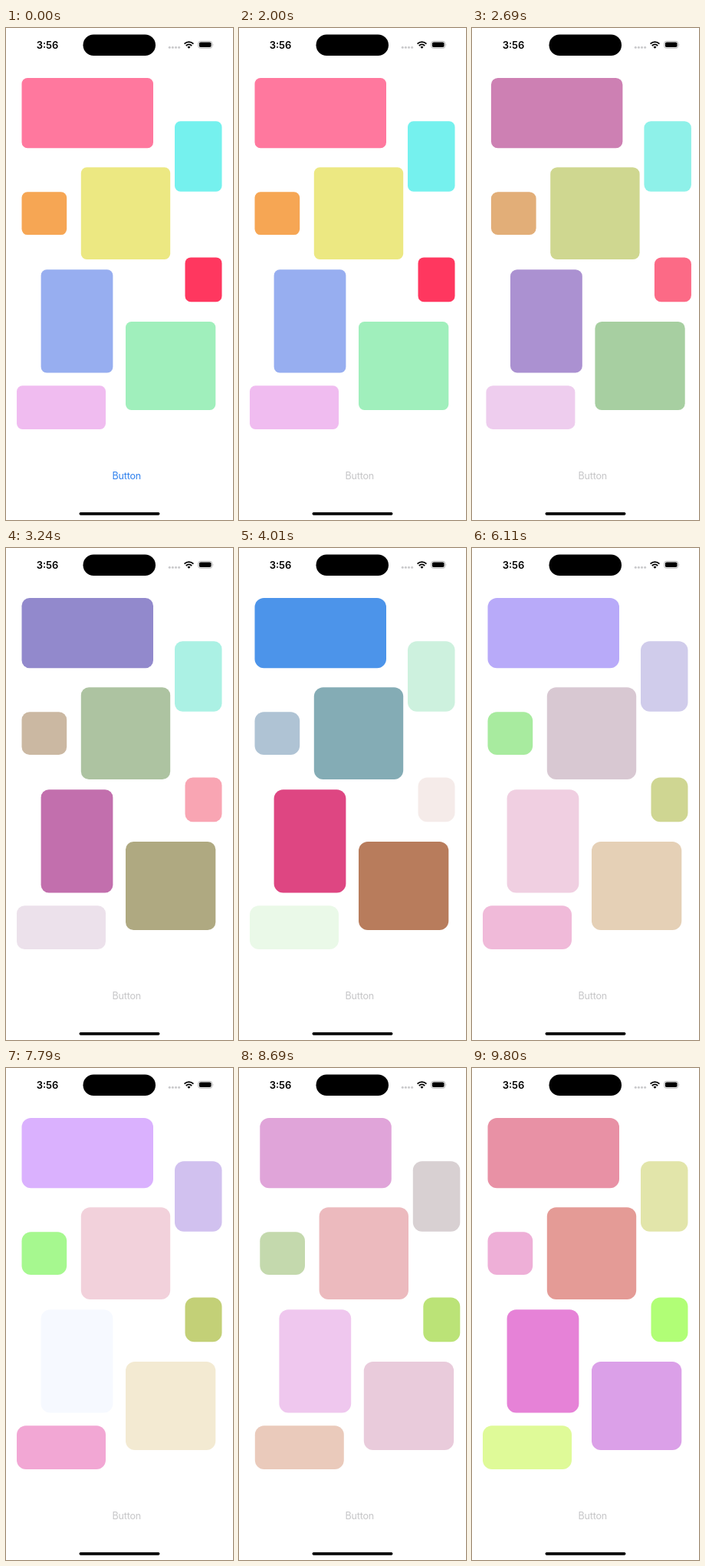
An HTML page that plays this animation: 296x640 px, repeating every 9.86 s.

```html
<!DOCTYPE html>
<html lang="en">
<head>
<meta charset="utf-8">
<title>Shaking blocks</title>
<style>
  html, body { margin: 0; width: 100%; height: 100%; overflow: hidden; background: #fff; }
  svg { display: block; width: 296px; height: 640px; }
  text { font-family: Inter, "Liberation Sans", sans-serif; text-anchor: middle; }
  .time { font-size: 13px; font-weight: 600; }
  .button { font-size: 12.5px; letter-spacing: -.15px; }
</style>
</head>
<body>
<svg viewBox="0 0 296 640">
  <g id="blocks"></g>
  <text class="time" x="54" y="26.7">3:56</text>
  <rect x="100.5" y="8.5" width="94.5" height="27.5" rx="13.75"/>
  <g fill="#c9c9cb">
    <circle cx="213.3" cy="25.3" r="1.5"/>
    <circle cx="217.4" cy="25.3" r="1.5"/>
    <circle cx="221.5" cy="25.3" r="1.5"/>
    <circle cx="225.6" cy="25.3" r="1.5"/>
  </g>
  <g fill="none" stroke="#000" stroke-width="1.8">
    <path d="M232.6 20.6a8.4 8.4 0 0 1 11.8 0"/>
    <path d="M234.8 23a5.3 5.3 0 0 1 7.4 0"/>
  </g>
  <path d="M238.5 26.8l-2-2a2.9 2.9 0 0 1 4 0z"/>
  <rect x="250.7" y="17.3" width="18" height="9" rx="2.8" fill="none" stroke="#a6a6a6" stroke-width=".8"/>
  <rect x="251.9" y="18.5" width="15.6" height="6.6" rx="1.8"/>
  <path d="M269.7 20.2q1.4 1.6 0 3.2z" fill="#a6a6a6"/>
  <text class="button" id="button" x="157.3" y="587">Button</text>
  <rect x="95.5" y="630" width="105" height="3.7" rx="1.85"/>
</svg>
<script>
const LOOP = 9860;
const FADE = 2000, SHAKE = 900, REACH = 7.5, PERIOD = 100, PEAK = 85;
const TAP = 1890;
const starts = [1990, 4742, 7798];

// x, y, width, height, then the colour before and after each tap
const blocks = [
  [20.5, 65, 171.5, 91.3, 'ff789e 4c94ea dab1fe e891a5'],
  [220, 121.3, 61.5, 91.5, '75f1ee cdf1de d1c1ef e2e5aa'],
  [97.8, 181.3, 116.4, 119.7, 'ece882 84acb5 f2d1db e49b96'],
  [20.5, 213.2, 58.7, 55.9, 'f6a654 afc3d4 a6f88f eeafd7'],
  [233.5, 298.4, 48, 57.8, 'ff375f f5ebe9 c3d077 b1fe76'],
  [45.6, 314.3, 93.8, 134.1, '97aef0 de4682 f6f9ff e682d7'],
  [156, 382, 117.3, 115, 'a0efbc b87c5c f3ead2 dba0e8'],
  [14, 465.3, 116, 56.6, 'f0bcf0 eaf9e8 f2a7d4 dffa98']
];

// screen refreshes: time, and how many even steps lead to the next entry
const ticks = [
  [0, 1], [1890, 7], [2690, 1], [2810, 1], [2920, 10], [4010, 1],
  [4590, 5], [5120, 5], [5670, 4], [6110, 6], [6750, 1],
  [7630, 1], [7790, 8], [8690, 1], [8790, 9], [9800, 1], [LOOP, 1]
];

const rgb = hex => [0, 2, 4].map(i => parseInt(hex.slice(i, i + 2), 16));
const mix = (a, b, k) => a + (b - a) * k;
const smooth = k => k * k * (3 - 2 * k);

const group = document.getElementById('blocks');
const button = document.getElementById('button');
const shapes = blocks.map(([x, y, width, height, colours]) => {
  const rect = document.createElementNS('http://www.w3.org/2000/svg', 'rect');
  Object.entries({ x, y, width, height }).forEach(([k, v]) => rect.setAttribute(k, v));
  group.append(rect);
  return { rect, colours: colours.split(' ').map(rgb) };
});

function refreshTime(t) {
  const i = ticks.findIndex(([at]) => at > t) - 1;
  const [from, steps] = ticks[i];
  const step = (ticks[i + 1][0] - from) / steps;
  return from + Math.floor((t - from) / step + 1e-6) * step;
}

function draw(time) {
  const t = refreshTime(time);
  const round = Math.max(0, starts.filter(s => s <= t).length - 1);
  const since = t - starts[round];
  const k = smooth(Math.min(1, Math.max(0, since / FADE)));
  const shaking = since >= 0 && since < SHAKE;
  const dx = shaking ? REACH * Math.cos(2 * Math.PI * (since - PEAK) / PERIOD) : 0;
  const radius = mix(7.5, 12, round ? 1 : k);

  group.setAttribute('transform', `translate(${dx.toFixed(2)} 0)`);
  shapes.forEach(({ rect, colours }) => {
    const next = colours[round + 1];
    const fill = colours[round].map((c, i) => Math.round(mix(c, next[i], k)));
    rect.setAttribute('fill', `rgb(${fill})`);
    rect.setAttribute('rx', radius.toFixed(2));
  });
  button.setAttribute('fill', t < TAP ? '#2f80ed' : '#c6c6c8');
}

const begin = performance.now();
function loop() {
  draw((performance.now() - begin) % LOOP);
  requestAnimationFrame(loop);
}
loop();
</script>
</body>
</html>
```
